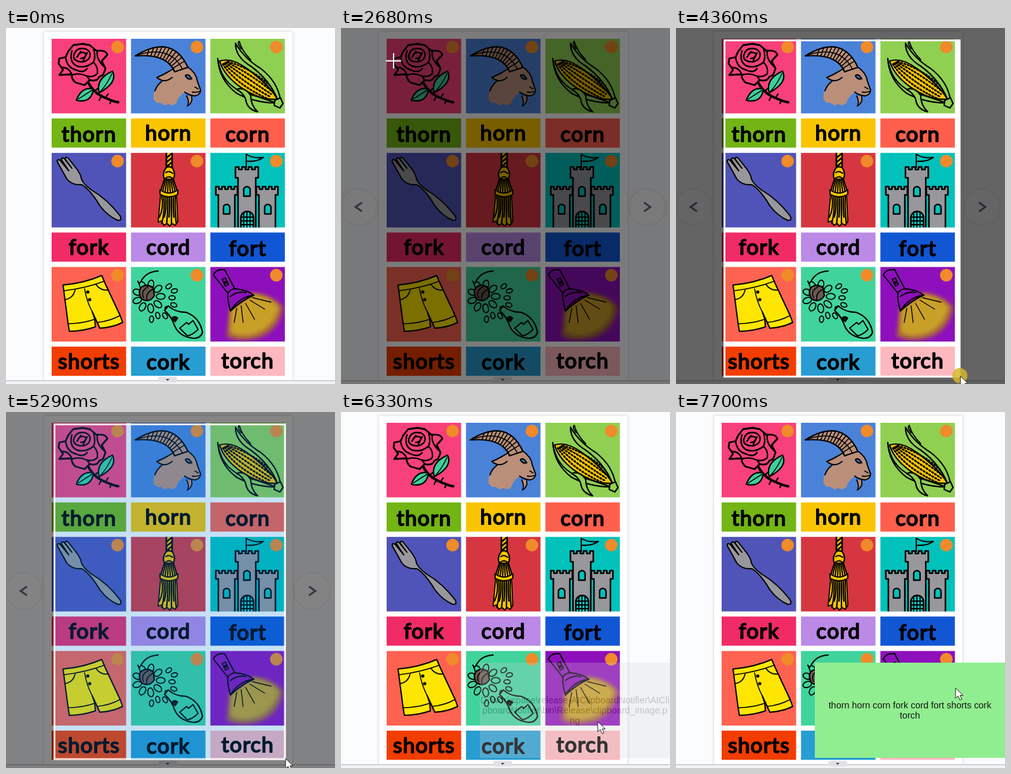
Animation of 519x561 px, one loop 8 s. Source, as an HTML page:

```html
<!DOCTYPE html>
<html lang="en">
<head>
<meta charset="utf-8">
<title>Word cards</title>
<style>
html, body { margin: 0; width: 100%; height: 100%; overflow: hidden; background: #fafcfe; }
svg { display: block; }
.art path, .art circle, .art ellipse { stroke: #000; stroke-width: 2.2; stroke-linejoin: round; stroke-linecap: round; fill: none; }
.word { font: 400 33.5px Lato, sans-serif; letter-spacing: 1.2px; text-anchor: middle; stroke: #000; stroke-width: 1.8; stroke-linejoin: round; }
.note { font: 14.4px "Liberation Sans", Arial, sans-serif; text-anchor: middle; fill: #151515; }
</style>
</head>
<body>
<svg id="stage" width="519" height="561" viewBox="0 0 519 561"></svg>
<script>
const stage = document.getElementById('stage');
const p = (d, fill = 'none', width = 2.2, extra = '') =>
  `<path d="${d}" style="fill:${fill};stroke-width:${width};${extra}"/>`;
const box = (x, y, w, h, fill, extra = '') =>
  `<rect x="${x}" y="${y}" width="${w}" height="${h}" fill="${fill}" ${extra}/>`;
const range = (n, f) => Array.from({ length: n }, (_, i) => f(i)).join('');

const GREY = '#98979c', LEAF = '#3fcf9b', BROWN = '#b98f7a', YELLOW = '#f6c400', TEAL = '#40d49c';

const rose = () =>
  p('M128 82Q135 100 152 108T177 117', 'none', 4) +
  p('M140 99l7-5M157 110l4-6M150 108l-3 6M166 114l-2 5') +
  p('M147 102Q141 80 168 68Q177 86 147 102', LEAF) + p('M149 100Q160 88 167 72', 'none', 1.5) +
  p('M138 96Q119 92 111 114Q135 119 138 96', LEAF) + p('M136 98Q126 104 114 112', 'none', 1.5) +
  p('M98 37L106 27 121 25 132 27 143 36Q157 34 160 42L151 52 157 64 153 74 147 77Q144 85 132 82L124 90 110 86Q104 82 103 73L84 74 90 66 83 56 84 48 94 46Z', '#f8417a', 2.8) +
  p('M108 40Q112 30 126 33Q136 38 131 48Q124 56 112 52Q104 48 108 40M114 42Q118 36 126 40Q126 48 118 48M112 46l6-9M122 51l6-12', 'none', 2.4) +
  p('M104 36Q99 54 112 60Q126 64 138 54Q142 46 138 32M94 46Q96 62 110 66Q122 72 128 64M138 54Q146 62 144 72Q138 78 128 76M88 62Q100 62 104 74Q116 70 128 76L132 82M144 37Q142 50 156 62', 'none', 2.4);

// Point at u on a quadratic curve.
const along = (u, [a, b, c]) => [0, 1].map(k => (1 - u) ** 2 * a[k] + 2 * u * (1 - u) * b[k] + u * u * c[k]);
const curve = ([a, b, c]) => `M${a}Q${b} ${c}`;
const hornTop = [[204, 44], [262, 8], [287, 62]], hornLow = [[204, 44], [254, 40], [266, 69]];

const goat = () =>
  p('M264 60Q280 56 288 62Q300 70 302 84L307 98Q306 106 298 107Q288 106 282 101Q270 110 269 118l-6 4-7-2-6 2-6-4-6 0-5-5Q230 98 246 84L238 78Q254 74 264 60Z', BROWN, 0, 'stroke:none') +
  p('M286 61Q300 70 302 84L307 98Q306 106 298 107Q288 106 282 101M246 84Q238 90 235 99M238 78Q252 72 264 64M238 78Q250 88 262 78', 'none', 2) +
  p(`${curve(hornTop)}L266 69Q254 40 204 44Z`, BROWN) +
  range(11, i => p(`M${along(.2 + i * .07, hornTop)}L${along(.2 + i * .07, hornLow)}`, 'none', 1.6)) +
  p('M206 43Q258 26 278 64', 'none', 1.6) +
  p('M285 107Q290 117 286 123Q295 118 293 108', BROWN, 1.8) +
  p('M283 75Q288 71 293 80Q286 82 283 75', '#3479bd', 2) +
  p('M298 93l5 3M294 101Q300 102 305 100', 'none', 1.8);

const corn = () =>
  p('M337 52Q356 46 380 64Q416 90 428 112Q404 115 374 96Q344 76 337 52Z', YELLOW) +
  range(5, i => p(`M${342 + i * 2} ${57 - i}Q${363 + i * 7} ${89 - i * 6} ${414 + i * 2} ${112 - i * 4}`, 'none', 2.8, 'stroke-dasharray:2 3.4')) +
  p('M362 24Q362 46 386 60Q416 82 428 112L433 113Q428 84 402 64Q376 48 362 24Z', '#8fd052') +
  p('M371 33Q364 24 368 21Q372 36 386 50', 'none', 1.8) +
  p('M334 48Q338 84 370 100Q398 108 426 118Q392 118 364 103Q336 82 334 48', '#8fd052') +
  p('M364 97Q376 92 386 106Q386 122 397 132Q380 128 378 112Q374 102 364 97', '#8fd052') +
  p('M424 114l9-4 4 9-5 7-9-4z', '#8fd052');

const fork = () =>
  p('M81 211Q80 206 85 208L99 225L87 207Q89 203 92 206L104 221L93 206Q95 202 98 205L110 220Q118 230 119 238Q122 246 136 256Q160 270 180 296Q184 304 176 303Q160 296 148 280Q134 256 120 247Q104 248 96 238Z', GREY, 2);

const tassel = () =>
  box(253, 197, 9, 26, YELLOW) + p('M253 197v24M262 197v24M254 204l7-6M254 211l7-6M254 218l7-6', 'none', 2.6) +
  p('M252 221Q257 216 263 221Q268 230 264 238L270 257Q257 266 244 257L250 238Q246 230 252 221Z', YELLOW) +
  p('M250 238Q257 231 264 238M252 228Q257 224 263 229', 'none', 2) +
  range(6, i => p(`M${252 + i * 2} 238L${247 + i * 4} 258`, 'none', 2)) +
  p('M244 262L240 306l5-2 4 7 5-3 4 4 4-4 5 3 4-6L269 262Z', YELLOW, 1.8) +
  range(8, i => p(`M${246 + i * 3} 265Q${249 + i * 2.4} 285 ${242 + i * 3.8} ${i % 2 ? 308 : 298}`, 'none', 2.2)) +
  p('M243 255Q257 265 271 255L271 262Q257 270 243 262Z', YELLOW, 2);

// Crenellated tower: wide parapet over a narrower body.
const tower = (x, y, w, parapet) => {
  const s = w / 7;
  return p(`M${x} ${y}${`h${s}v4h${s}v-4`.repeat(3)}h${s}v${parapet}h-4V318h${8 - w}V${y + parapet}h-4Z`, GREY, 2.5);
};
const arch = (x, y, w, h, fill) => p(`M${x - w} ${y + h}v${-h}a${w} ${w} 0 0 1 ${2 * w} 0v${h}Z`, fill, 2.4);
const castle = () =>
  p('M379 220V199Q390 206 406 204Q396 211 381 210', '#00c2bb', 2) +
  tower(331, 250, 34, 13) + tower(395, 250, 34, 13) + tower(362, 219, 36, 17) +
  [[380, 255], [348, 283], [413, 283]].map(([x, y]) => arch(x, y, 5, 10, '#00c2bb')).join('') +
  arch(380.5, 299, 10, 18, '#00c2bb') + p('M375 291v25M380 289v27M385 291v25M371 298h19M371 304h19M371 310h19', 'none', 1.8);

const shorts = () =>
  p('M90 405Q124 402 151 390L157 404 180 453 184 464Q168 472 148 473L136 447 140 459 141 471Q120 478 100 478L98 466Z', '#ffe600', 2) +
  p('M92 414Q126 410 155 399M98 466Q120 466 140 459M144 464Q164 462 180 453M124 411Q127 430 136 447M93 428Q106 426 109 413M142 404Q148 414 162 413', 'none', 1.6) +
  '<circle cx="129" cy="416" r="1.5"/><circle cx="132" cy="428" r="1.5"/>';

const drop = (cx, cy, r, a, size) => {
  const x = cx + r * Math.cos(a), y = cy + r * Math.sin(a);
  return `<ellipse cx="${x}" cy="${y}" rx="${size}" ry="${size * .65}" transform="rotate(${a * 57.3} ${x} ${y})" style="fill:${TEAL};stroke-width:1.8"/>`;
};
const cork = () =>
  p('M240 383Q218 384 211 404M208 399l3 6 6-4', 'none', 2) +
  range(9, i => drop(225, 423, 19, i * .7, 7)) +
  range(8, i => drop(232, 424, 30 + i % 2 * 5, i * .32 - .6, 5)) +
  p('M212 410Q220 402 232 409L234 422Q226 434 214 427Q208 418 212 410Z', '#685850') +
  p('M217 425Q212 414 224 408M222 428Q220 418 231 412', 'none', 1.5) +
  p('M250 445L256 438Q267 448 284 448Q306 456 310 480Q305 492 290 488Q270 484 264 464Q260 454 250 445Z', TEAL) +
  p('M274 473L285 464 288 467 295 461 303 475Q294 484 286 485Z', TEAL, 1.8) +
  p('M261 458Q265 452 271 457L267 463Z', '#111', 1.5);

const glow = (d, fill) => `<g style="filter:blur(3px)">${p(d, fill, 0, 'stroke:none')}</g>`;
const torch = () =>
  glow('M353 442L390 417Q424 422 437 440Q432 474 402 487Q370 497 348 486Z', '#a8663c') +
  glow('M355 444L390 420Q418 424 430 440Q424 468 398 480Q372 490 354 479Z', '#c9a027') +
  p('M327 389Q332 379 345 381L361 411Q379 412 391 421Q372 429 354 446Q349 428 350 418Z', '#8e10bc', 2) +
  p('M350 418Q353 412 361 411M354 423Q366 414 378 417M354 446Q367 424 391 421', 'none', 2) +
  p('M341 396l5-2 5 10-5 3z', '#8e10bc', 1.8) + '<circle cx="346" cy="401" r="1.5"/>' +
  p('M364 442l-4 22M371 438l3 26M378 434l14 25M385 429l23 14M389 425l29 7', 'none', 1.4);

const cards = [
  ['thorn', '#f8417a', '#72b514', 178.5, rose], ['horn', '#4a82d8', '#fac400', 177, goat], ['corn', '#8fd052', '#fd5f4c', 179, corn],
  ['fork', '#5054b8', '#f02b66', 357, fork], ['cord', '#d63640', '#bb89e6', 357, tassel], ['fort', '#00c2bb', '#1157d4', 359, castle],
  ['shorts', '#fd6350', '#f23d00', 536.5, shorts], ['cork', TEAL, '#279dd2', 538, cork], ['torch', '#8e10bc', '#feb8bf', 536, torch]
];
const card = ([word, back, label, base, art], i) => {
  const x = 72 + i % 3 * 125.2, y = 17 + Math.floor(i / 3) * 179.8;
  return `<clipPath id="c${i}">${box(x, y, 117.5, 117.5)}</clipPath>` +
    box(x, y, 117.5, 117.5, back) + `<g class="art" clip-path="url(#c${i})">${art()}</g>` +
    `<circle cx="${x + 104}" cy="${y + 13}" r="10" fill="#f08a2a"/>` +
    box(x, y + 125.5, 117.5, 46, label) + `<text class="word" x="${x + 59}" y="${base}">${word}</text>`;
};

const arrowButton = (x, dir) =>
  `<circle cx="${x}" cy="282" r="27.5" fill="#fdfeff" style="filter:drop-shadow(0 0 2px #0002)"/>` +
  `<path d="M${x - 5 * dir} 275l${10 * dir} 7l${-10 * dir} 7" fill="none" stroke="#6b6880" stroke-width="3"/>`;
const lines = (list, y) => list.map((s, i) => `<text class="note" x="369" y="${y + i * 16}">${s}</text>`).join('');
const notice = (id, fill, text) => `<g id="${id}">${box(219, 395, 300, 150, fill)}${text}</g>`;

stage.innerHTML =
  box(0, 0, 519, 561, '#fafcfe') +
  box(60, 6, 392, 560, '#fff', 'style="filter:drop-shadow(0 0 2px #0003)"') +
  cards.map(card).join('') +
  box(0, 555, 519, 6, '#f3f4f6') + box(0, 555, 519, 1.5, '#c4c5c9') +
  box(240, 549.5, 30, 9, '#e1e2e4', 'rx="4"') + '<path d="M252 553h6l-3 3z" fill="#444"/>' +
  `<g id="arrows">${arrowButton(28, -1)}${arrowButton(483, 1)}</g>` +
  '<g id="snip"><path id="dim" fill-rule="evenodd" fill-opacity=".6"/><rect id="pick" stroke="#fff" stroke-width="3"/></g>' +
  notice('path', '#d3d3d3', lines(['D:\\workspace\\release-AIClipboardNotifier\\AICli', 'pboardNotifier\\bin\\Release\\clipboard_image.p', 'ng'], 459)) +
  notice('done', '#90ee90', lines(['thorn horn corn fork cord fort shorts cork', 'torch'], 467)) +
  `<g id="cursor">
    <circle id="press" cx="-1" cy="-1" r="12" fill="#d6b62c" fill-opacity=".85"/>
    <path id="pointer" d="M0 0V16L4 12.5L7 19L10 17.5L7 11.5H12Z" fill="#fff" stroke="#222"/>
    <path id="hand" d="M-3 8L-8 1Q-8-2-5 0L-4 1-6-5Q-5-7-3-5L-2-1-2-7Q0-9 1-7L1-1 3-6Q5-7 5-5L4 0 6-3Q8-3 8-1L5 8Z" fill="#fff" stroke="#222"/>
    <path id="cross" d="M-12 0H12M0-12V12" stroke="#fff" stroke-width="2"/>
  </g>`;

const $ = id => document.getElementById(id);
const show = (id, on) => { $(id).style.display = on ? '' : 'none'; };
const ramp = (t, a, b) => Math.min(1, Math.max(0, (t - a) / (b - a)));

// time, x, y
const track = [
  [330, 496, 434], [740, 482, 426], [940, 480, 425], [1200, 477, 425], [1530, 475, 426], [1800, 475, 426],
  [2140, 336, 346], [2560, 86, 64], [2680, 83, 52], [2950, 76, 18], [3730, 330, 399], [4290, 448, 548],
  [4400, 449, 549], [4560, 448, 549], [4630, 444, 547], [4760, 444, 547], [4830, 441, 546],
  [5640, 441, 546], [6330, 405, 488], [6700, 408, 474], [7630, 441, 435]
];
const cursorAt = t => {
  const i = track.findIndex(k => k[0] > t);
  if (i < 0) return track[track.length - 1].slice(1);
  if (!i) return track[0].slice(1);
  const [a, b] = [track[i - 1], track[i]], f = ramp(t, a[0], b[0]);
  return [a[1] + (b[1] - a[1]) * f, a[2] + (b[2] - a[2]) * f];
};

function draw(t) {
  const [x, y] = cursorAt(t);
  $('cursor').setAttribute('transform', `translate(${x} ${y})`);
  show('cursor', t >= 330);
  const hand = t >= 1870 && t < 2540 && x < 452, cross = t >= 2540 && t < 2950;
  show('hand', hand);
  show('cross', cross);
  show('pointer', !hand && !cross);
  show('press', t >= 2950 && t < 4830);

  $('arrows').style.opacity = t < 5360 ? ramp(t, 300, 660) : 0;

  // The selection trails the cursor slightly.
  const dragging = t >= 2950, [ex, ey] = cursorAt(t - 35), left = 76.5, top = 19.5;
  const w = dragging ? Math.max(0, ex - 1 - left) : 0, h = dragging ? Math.max(0, ey + 1 - top) : 0;
  $('snip').style.opacity = ramp(t, 2500, 2710) * (1 - ramp(t, 5240, 5500));
  $('dim').setAttribute('d', `M0 0H519V561H0ZM${left} ${top}h${w}v${h}h${-w}Z`);
  const pick = $('pick');
  Object.entries({ x: left, y: top, width: w, height: h }).forEach(([k, v]) => pick.setAttribute(k, v));
  pick.setAttribute('fill', t >= 5290 ? 'rgba(0,120,215,.28)' : 'none');
  show('pick', dragging);

  $('path').style.opacity = ramp(t, 6040, 7220);
  show('path', t < 7560);
  show('done', t >= 7560);
}

function tick() {
  draw(performance.now() % 8000);
  requestAnimationFrame(tick);
}
tick();
</script>
</body>
</html>
```
